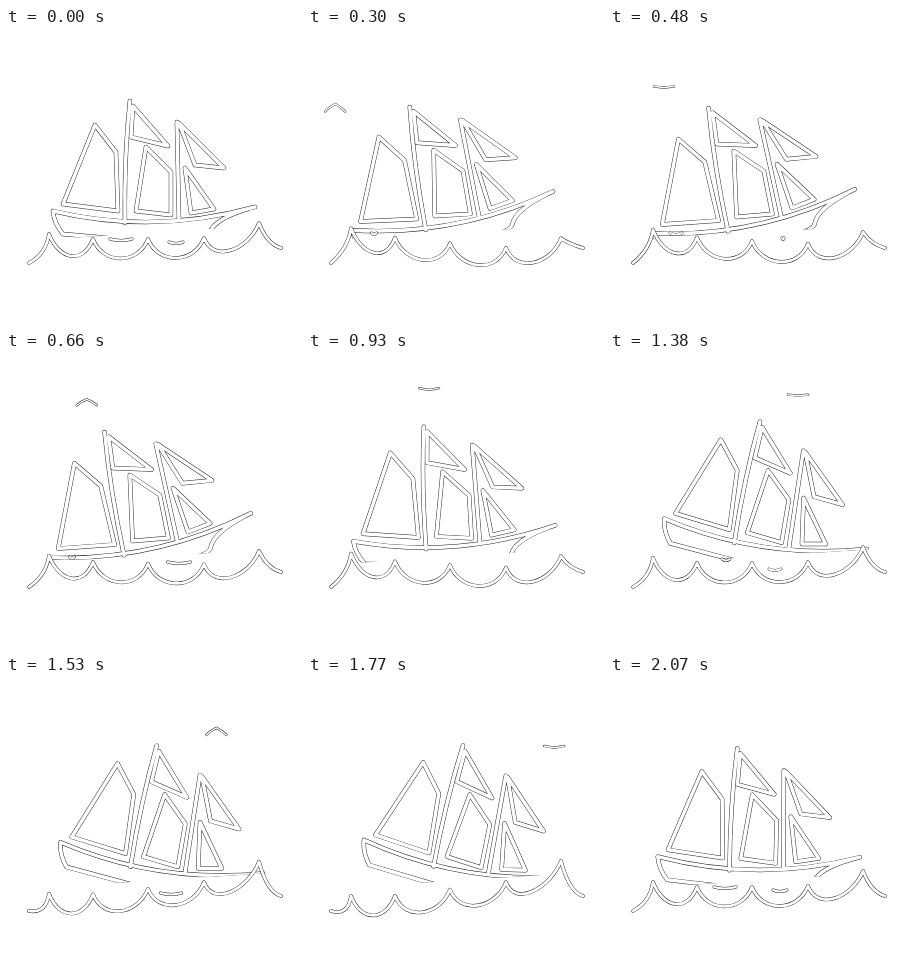
Write an HTML page with a canvas that moves like this. It is 296 px wide and 296 px high and loops after 2.1 s.

```html
<!DOCTYPE html>
<html lang="en">
<head>
<meta charset="utf-8">
<title>Sailing ship</title>
<style>
html, body { margin: 0; width: 100%; height: 100%; overflow: hidden; background: #fff; }
canvas { display: block; width: 296px; height: 296px; }
</style>
</head>
<body>
<canvas id="stage"></canvas>
<script>
const SIZE = 296, LOOP = 2100;
const canvas = document.getElementById('stage');
const ratio = window.devicePixelRatio || 1;
canvas.width = canvas.height = SIZE * ratio;
const ctx = canvas.getContext('2d');
ctx.scale(ratio, ratio);
ctx.lineCap = ctx.lineJoin = 'round';

// Heel of the ship and slope of the sea at a few key times
const TIMES = [0, 300, 660, 1200, 1530, 1770, 2070];
const HEEL = [0, -.86, -1, .69, .87, 1, .12];
const SLOPE = [0, 1, .3, 1, -1, -1.15, 0];

// The upright ship: sails, masts, deck, hull
const SHIP = new Path2D(`
  M89 97L110 124L112 183L57 176Z
  M127 78L162 118L125 109Z
  M140 119L165 144L165 187L130 183Z
  M173 95L218 140L189 137Z
  M179 140L208 181L185 185Z
  M124 73Q118 130 119 195
  M171 94Q172 140 173 192
  M47 183Q148 207 249 179
  M47 183Q48 195 57 206L123 212H160Q202 212 204 204Q209 191 242 181`);

const CRESTS = [[43, 206], [87, 211], [142, 211], [198, 210], [253, 195]];
const RIPPLE_LIFE = 400;
// x, y, width, start
const RIPPLES = [
  [115, 211, 22, 1885], [170, 214, 14, 1885], [66, 205, 12, 280],
  [173, 210, 23, 480], [116, 207, 20, 1000], [165, 217, 21, 1340]
];

// Smooth periodic curve through the values at TIMES, flat at its extremes
function spline(t, values) {
  const n = TIMES.length;
  const time = k => TIMES[(k + n) % n] + LOOP * Math.floor(k / n);
  const value = k => values[(k + n) % n];
  const rate = k => (value(k + 1) - value(k)) / (time(k + 1) - time(k));
  const tangent = k => rate(k - 1) * rate(k) <= 0 ? 0
    : (value(k + 1) - value(k - 1)) / (time(k + 1) - time(k - 1));
  let i = n - 1;
  while (TIMES[i] > t) i--;
  const span = time(i + 1) - time(i), u = (t - time(i)) / span, v = 1 - u;
  return value(i) * v * v * (1 + 2 * u) + value(i + 1) * u * u * (3 - 2 * u)
    + span * u * v * (tangent(i) * v - tangent(i + 1) * u);
}

// White line with a hairline edge; joined parts share one outline
function outline(path, width) {
  ctx.strokeStyle = '#222';
  ctx.lineWidth = width;
  ctx.stroke(path);
  ctx.strokeStyle = '#fff';
  ctx.lineWidth = width - .9;
  ctx.stroke(path);
}

// Rocks about a point at the keel; the hull is hidden below the waterline
function ship(t) {
  const s = spline(t, HEEL), tilt = .2 * s;
  const path = new Path2D();
  path.addPath(SHIP, new DOMMatrix([
    1, tilt, -tilt, 1, 214 * tilt + 2.8 * s * s, -151 * tilt + 1.8 * s * s
  ]));
  ctx.save();
  ctx.beginPath();
  ctx.moveTo(0, 0);
  ctx.lineTo(SIZE, 0);
  ctx.lineTo(SIZE, 195);
  ctx.lineTo(0, 214);
  ctx.clip();
  outline(path, 4.4);
  ctx.restore();
}

function sea(t) {
  const slope = spline(t, SLOPE);
  const path = new Path2D();
  let x0, y0;
  path.moveTo(23, 235);
  for (const [x, base] of CRESTS) {
    const y = base + slope * (x - 130) / 10 + 3 * slope * slope;
    if (x0) path.bezierCurveTo(x0 + 10, y0 + 26, x - 10, y + 26, x, y);
    else path.quadraticCurveTo(40, y + 20, x, y);
    [x0, y0] = [x, y];
  }
  path.quadraticCurveTo(261, 216, 275, 220);
  outline(path, 3.6);
}

function ripples(t) {
  const path = new Path2D();
  for (const [x, y, width, start] of RIPPLES) {
    const u = (t - start + LOOP) % LOOP / RIPPLE_LIFE;
    if (u >= 1) continue;
    const half = width / 2 * Math.sqrt(Math.sin(Math.PI * u));
    path.moveTo(x - half, y);
    path.quadraticCurveTo(x, y + 3, x + half, y);
  }
  outline(path, 3);
}

function bird(t) {
  if (t < 295 || t > 1830) return;
  const x = 27 + .149 * (t - 300);
  const y = 36.5 + .0031 * (x - 140) ** 2;
  const flap = 3 + 4.5 * Math.cos(2 * Math.PI * (t - 300) / 420);
  const path = new Path2D();
  path.moveTo(x - 10, y + flap);
  path.quadraticCurveTo(x - 5, y + flap * .3, x, y);
  path.quadraticCurveTo(x + 5, y + flap * .3, x + 10, y + flap);
  outline(path, 2.4);
}

function frame() {
  const t = performance.now() % LOOP;
  ctx.clearRect(0, 0, SIZE, SIZE);
  ship(t);
  ripples(t);
  sea(t);
  bird(t);
  requestAnimationFrame(frame);
}
frame();
</script>
</body>
</html>
```
